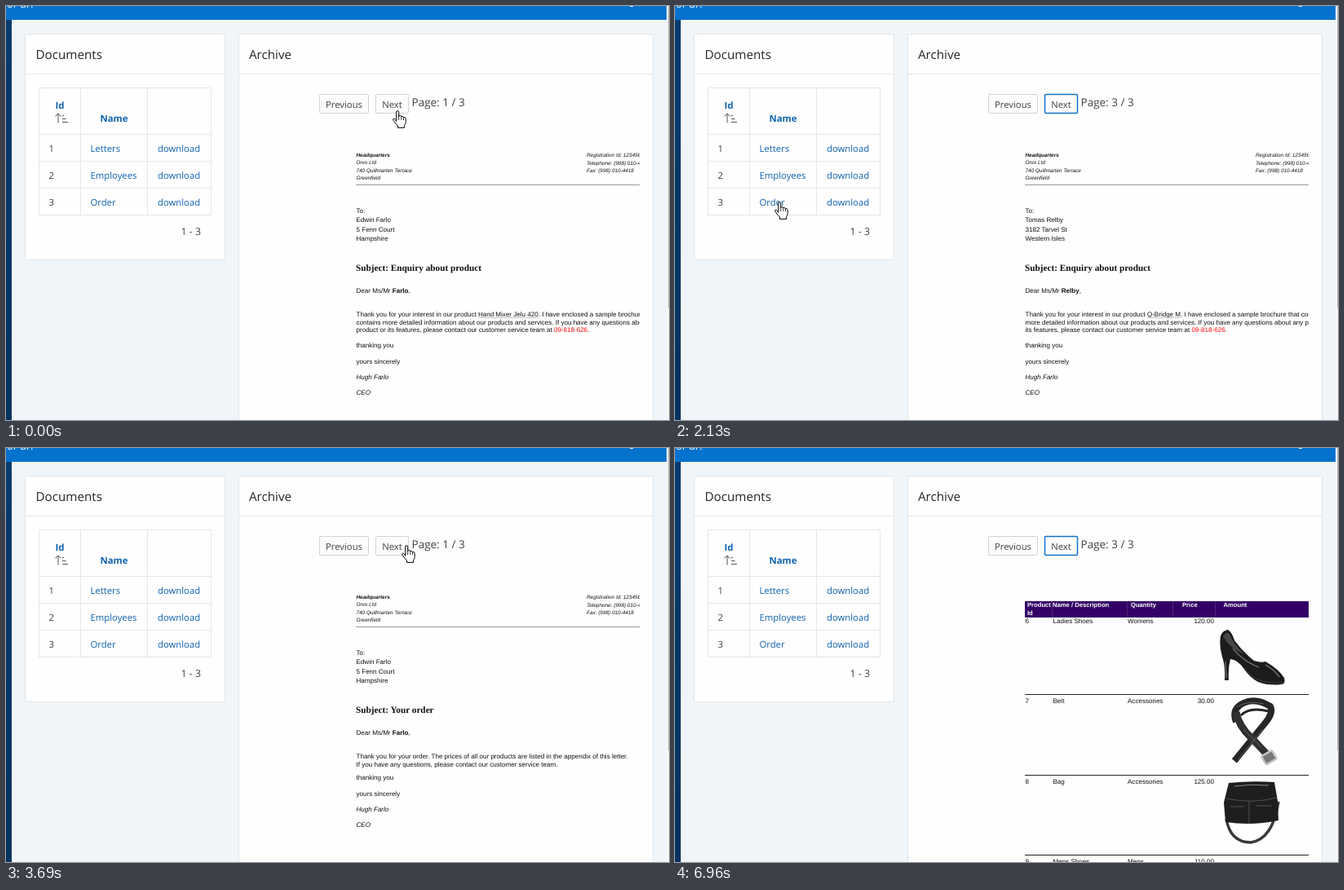
Recreate the animation shown at these times as an HTML page. Size 813x508 px, loop 7360 ms.

```html
<!DOCTYPE html>
<html lang="en">
<head>
<meta charset="utf-8">
<title>Document archive</title>
<style>
html, body { margin: 0; width: 100%; height: 100%; overflow: hidden; background: #f0f5f9; }
svg { display: block; width: 100vw; height: 100vh; }
text { white-space: pre; text-rendering: geometricPrecision; fill: #404040; font: 11.3px "Open Sans", sans-serif; }
.title { font-size: 15.2px; fill: #262626; }
.head { font-weight: 700; font-size: 11.4px; fill: #1062b0; }
.link { fill: #1062b0; }
.page { font-size: 13.5px; }
.range { font-size: 12.3px; }
.mid { text-anchor: middle; }
.end { text-anchor: end; }
.doc text { font: 8.05px "Liberation Sans", Arial, sans-serif; fill: #111; }
.doc .note { font-size: 6.4px; font-style: italic; }
.doc .bold { font-weight: 700; }
.doc .ital { font-style: italic; }
.doc .subject { font: 700 11.25px "Liberation Serif", serif; }
.doc .caption { font-size: 9.75px; font-weight: 700; }
.doc .col { font-size: 7.65px; font-weight: 700; fill: #fff; }
.mark { fill: #b5b5b5; text-decoration: underline; }
.mark tspan { fill: #111; }
.doc, .cursor { visibility: hidden; }
.on { visibility: visible; }
.grid { fill: none; stroke: #e6e6e6; }
.panel { fill: #fefefe; stroke: #e1e5e8; }
.btn { fill: #fcfcfc; stroke: #d4d4d4; }
#glow { fill: none; stroke: none; }
.focus #next { fill: #fdfdfd; stroke: #1272ca; stroke-width: 1.5; }
.press #next { fill: #dedede; stroke: #5089c2; }
.press #glow { stroke: #d3e4f4; }
.cursor path { stroke: #000; fill: #fff; }
</style>
</head>
<body>
<svg viewBox="0 0 813 508">
  <defs>
    <linearGradient id="side" x2="0" y2="1">
      <stop stop-color="#063b6f"/><stop offset="1" stop-color="#03335f"/>
    </linearGradient>
    <linearGradient id="cloth" x2="1">
      <stop stop-color="#d4d4d6"/><stop offset=".5" stop-color="#e9e9ea"/><stop offset="1" stop-color="#d9d9db"/>
    </linearGradient>
    <clipPath id="view"><rect x="428" y="140" width="349" height="368"/></clipPath>
  </defs>
  <rect width="813" height="508" fill="#f0f5f9"/>
  <rect y="17" width="7" height="491" fill="url(#side)"/>
  <rect width="810" height="17" fill="#0572ce"/>
  <text x="1" y="2" style="font-size:13px;fill:#fff">or ar.</text>
  <rect x="765" width="4" height="1" fill="#e4eff9"/>
  <rect x="810" width="3" height="508" fill="#f6f6f6"/>
  <rect x="812" width="1" height="371" fill="#b9b9b9"/>

  <rect class="panel" x="23.5" y="34.5" width="245" height="277" rx="2"/>
  <rect class="panel" x="285.5" y="34.5" width="508" height="490" rx="2"/>
  <path class="grid" d="M24 83.5H268M286 83.5H793"/>
  <path class="grid" d="M40.5 100.5H251.5V256.5H40.5ZM91.5 100V256M173.5 100V256M40 157.5H252M40 190.5H252M40 223.5H252"/>
  <path d="M64 143.5V132M60.5 135.5L64 132L67.5 135.5M69 134.5H71M69 138.5H73.5M69 142.5H76" fill="none" stroke="#555"/>
  <g id="labels"></g>

  <rect class="btn" x="384.5" y="108.5" width="60" height="23" rx="1.5"/>
  <g id="button">
    <rect id="glow" x="452.5" y="107.5" width="42" height="25" rx="2.5"/>
    <rect id="next" class="btn" x="453.5" y="108.5" width="40" height="23" rx="1.5"/>
  </g>
  <text class="mid" x="414.5" y="125">Previous</text>
  <text class="mid" x="473.5" y="125">Next</text>
  <text class="page" id="count" x="497.5" y="123">Page: 1 / 3</text>

  <g id="docs" clip-path="url(#view)"></g>

  <g id="pointer">
    <g class="cursor" id="hand">
      <path d="M4.700 13.500V2.200Q4.700 .6 6.200 .6T7.700 2.200V7.500Q7.900 6.300 9.300 6.500T10.800 8Q11 7 12.200 7.400T13.500 9Q13.800 8.200 14.900 8.600T16.200 10.200V14.500Q16 17 14.500 18.500V21.400H6.500V19Q4.200 16.800 .9 12.200Q.2 10.800 1.300 10.200T3.600 11.500Z"/>
      <path d="M7.700 7V12M10.800 8V12M13.500 9V12" stroke-width=".8"/>
    </g>
    <g class="cursor" id="arrow"><path d="M.5 .8V16.300L4.200 12.800L6.600 18.400L8.900 17.400L6.500 12H11.400Z"/></g>
    <g class="cursor" id="beam"><path d="M1 .5H3.500L4.500 1.500L5.500 .5H8M4.500 1V15M1 15.500H3.500L4.500 14.500L5.500 15.500H8" style="fill:none"/></g>
  </g>
</svg>
<script>
const $ = id => document.getElementById(id);
const text = (x, y, s, cls = "") => `<text x="${x}" y="${y}" class="${cls}">${s}</text>`;
const lines = (x, y, step, list, cls) => list.map((s, i) => text(x, y + i * step, s, cls)).join("");
const shape = (d, fill) => `<path d="${d}" fill="${fill}"/>`;
const stroke = (d, color, width) => `<path d="${d}" fill="none" stroke="${color}" stroke-width="${width}"/>`;

$("labels").innerHTML =
  text(36.5, 65, "Documents", "title") + text(298, 65, "Archive", "title") +
  text(66, 126, "Id", "head mid") + text(132.5, 142, "Name", "head mid") +
  ["Letters", "Employees", "Order"].map((name, i) => {
    const y = 179 + 33 * i;
    return text(52.5, y, i + 1) + text(103.5, y, name, "link") + text(186, y, "download", "link");
  }).join("") + text(239, 281, "1 - 3", "range end");

// Letter pages
function letter({ to, subject, name, body, close = 419 }) {
  return text(429.5, 184.5, "Headquarters", "note bold") +
    lines(429.5, 194, 9.6, ["Orvo Ltd", "740 Quillmarten Terrace", "Greenfield"], "note") +
    lines(712, 185, 9.5, ["Registration Id: 123456789", "Telephone: (998) 010-4417", "Fax: (998) 010-4418"], "note") +
    stroke("M429 219.5H777", "#9a9a9a", 1) +
    text(429.5, 254, "To:") + lines(429.5, 265, 11.5, to) +
    text(429, 324.5, subject, "subject") +
    text(429.5, 352, `Dear Ms/Mr <tspan class="bold">${name}</tspan>,`) +
    lines(429.5, 381, 9.5, body) +
    lines(429.5, close, 19.5, ["thanking you", "yours sincerely"]) +
    lines(429.5, close + 39, 19.2, ["Hugh Farlo", "CEO"], "ital");
}
const offer = product => `Thank you for your interest in our product <tspan class="mark"><tspan>${product}</tspan></tspan>. I have enclosed a sample brochure that`;
const detail = "more detailed information about our products and services. If you have any questions about any";
const contact = 'its features, please contact our customer service team at <tspan fill="#f00">09-818-626</tspan>.';
const enquiry = (to, product, early) => letter({
  to, subject: "Subject: Enquiry about product", name: to[0].split(" ")[1],
  body: early
    ? [offer(product) + " contains", detail + " product or", contact]
    : [offer(product), "contains " + detail, "product or " + contact]
});

// Price list pages
function priceList(top, rows) {
  const head = top + 7;
  const bar = Math.round(top);
  return `<rect x="429" y="${bar}" width="348" height="20" fill="#330066"/>` +
    [462.5, 554.5, 610.5, 662.5].map(x => stroke(`M${x} ${bar}v20`, "#4d2578", 1)).join("") +
    lines(432, head, 9.3, ["Product", "Id"], "col") +
    [[463, "Name / Description"], [559, "Quantity"], [622, "Price"], [672.5, "Amount"]]
      .map(([x, s]) => text(x, head, s, "col")).join("") +
    rows.map(([id, name, group, price], i) => {
      const y = top + 98.4 * i, base = y + 26.4;
      return text(429.5, base, id) + text(463.5, base, name) + text(555, base, group) +
        text(661, base, price, "end") + stroke(`M429 ${Math.round(y + 114) + .5}H777`, "#222", 1);
    }).join("");
}

const shirt = shape("M692 234L700 231H718L727 234Q735 240 738 268L741 305L730 308H700L686 307L676 304Q675 299 678 297L684 268Q687 242 692 234Z", "url(#cloth)") +
  shape("M695 233L701 231H717L723 233L718 246L709 238L699 247Z", "#f3f3f3") +
  shape("M701 232H716L709 238Z", "#b9b9bc") +
  stroke("M695 233L699 247L709 238L718 246L723 233M709 239L710 307M694 262L691 298L699 307M678 297L692 300M715 262H728", "#bcbcc0", 1);
const trousers = shape("M695 330L718 327Q721 345 721 370L723 405L711 408Q709 380 708 360L705 408L694 405Q692 360 695 330Z", "#202224") +
  stroke("M700 334Q698 365 700 404M714 333Q715 365 717 403", "#3b3e41", 1);
const jacket = shape("M700 439L708 438L716 440L726 446L730 486L724 489L721 470L722 494Q708 498 693 494L694 470L690 489L685 486L689 446Z", "#1b1b1d") +
  stroke("M701 440L708 465L716 441M708 465V495M695 480L702 479M714 479L720 480", "#424246", 1);
const shoe = shape("M669 231Q671 224 678 223Q683 226 686 236Q696 250 710 261Q719 264 724 262Q740 271 747 282Q749 289 744 290Q727 292 715 287Q704 281 697 270Q690 260 681 259Q678 270 679 285H674Q675 268 671 256Q667 243 669 231Z", "#1c1c1c") +
  shape("M672 231Q676 225 680 228Q684 240 698 253Q680 246 672 231Z", "#474747") +
  stroke("M684 246Q697 262 716 269M724 266Q735 272 741 281M675 262L676 282", "#666", 1.5) +
  stroke("M698 270Q708 286 730 288H745", "#3d3d3d", 1);
const belt = stroke("M688 336Q682 320 697 313T730 317Q734 325 724 337L686 384", "#262626", 8) +
  stroke("M688 324Q691 341 707 356L727 377", "#303030", 9) +
  stroke("M694 328Q704 317 728 323", "#262626", 3) +
  stroke("M689 318Q702 309 722 314M721 345L690 383M697 345L719 367", "#606060", 1) +
  '<rect x="721" y="374" width="15" height="12" rx="2" transform="rotate(-30 728 380)" fill="#777" stroke="#c4c4c4" stroke-width="2.5"/>';
const bag = stroke("M676 455Q681 484 706 484Q733 480 740 434", "#3a3a3a", 3.5) +
  shape("M679 411Q706 408 735 410L739 433L740 457Q708 464 675 459L673 435Z", "#1e1e1e") +
  stroke("M686 415Q706 412 728 414", "#8a8a8a", 1) +
  stroke("M676 430Q707 437 738 429M704 433V461M681 440H698M712 439H732", "#505050", 1);

const docs = {
  letter1: enquiry(["Edwin Farlo", "5 Fenn Court", "Hampshire"], "Hand Mixer Jelu 420"),
  letter2: enquiry(["Corin Blemm", "7 Hazlock St", "Devon"], "Velumgrain TAN"),
  letter3: enquiry(["Tomas Relby", "3182 Tarvel St", "Western Isles"], "Q-Bridge M", true),
  order1: letter({
    to: ["Edwin Farlo", "5 Fenn Court", "Hampshire"], subject: "Subject: Your order", name: "Farlo", close: 407,
    body: ["Thank you for your order. The prices of all our products are listed in the appendix of this letter.",
      "If you have any questions, please contact our customer service team."]
  }),
  order2: text(429.5, 197, "Appendix: Price list", "caption") + priceList(208, [
    [1, "Business Shirt", "Mens", "50.00"], [2, "Trousers", "Mens", "80.00"], [3, "Jacket", "Mens", "150.00"]
  ]) + shirt + trousers + jacket,
  order3: priceList(188.3, [
    [6, "Ladies Shoes", "Womens", "120.00"], [7, "Belt", "Accessories", "30.00"],
    [8, "Bag", "Accessories", "125.00"], [9, "Mens Shoes", "Mens", "110.00"]
  ]) + shoe + belt + bag
};
$("docs").innerHTML = Object.entries(docs).map(([id, body]) => `<g class="doc" id="${id}">${body}</g>`).join("");

// Each track holds [start in ms, value...] and jumps between its values
const LOOP = 7360;
const docTrack = [[0, "letter1"], [130, ""], [280, "letter2"], [800, "letter3"], [3150, ""],
  [3420, "order1"], [3960, "order2"], [5040, "order3"]];
const pageTrack = [[0, 1], [280, 2], [800, 3], [3150, 1], [3960, 2], [5040, 3]];
const buttonTrack = [[0, ""], [130, "press"], [280, "focus"], [680, "press"], [800, "focus"], [2290, ""],
  [3840, "press"], [3960, "focus"], [4920, "press"], [5040, "focus"]];
const cursorTrack = [[0, "hand", 474, 128], [1200, "arrow", 391, 143], [1350, "arrow", 273, 192],
  [1500, "arrow", 215, 214], [1620, "arrow", 162, 232], [1890, "hand", 140, 241], [2010, "hand", 124, 242],
  [2130, "hand", 122, 240], [2430, "arrow", 215, 212], [2580, "arrow", 313, 184], [2850, "hand", 482, 118],
  [3270, "beam", 494, 110], [3570, "hand", 485, 119], [6190, "hand", 497, 132], [6350, "arrow", 590, 251],
  [6500, "arrow", 592, 256], [6650, "arrow", 711, 422], [6960, "", 0, 0]];

const at = (track, t) => track.findLast(step => step[0] <= t);
const show = (selector, id) =>
  document.querySelectorAll(selector).forEach(el => el.classList.toggle("on", el.id === id));

function draw() {
  const t = performance.now() % LOOP;
  const [, kind, x, y] = at(cursorTrack, t);
  show(".doc", at(docTrack, t)[1]);
  show(".cursor", kind);
  $("pointer").setAttribute("transform", `translate(${x} ${y})`);
  $("button").setAttribute("class", at(buttonTrack, t)[1]);
  $("count").textContent = `Page: ${at(pageTrack, t)[1]} / 3`;
  requestAnimationFrame(draw);
}
draw();
</script>
</body>
</html>
```
